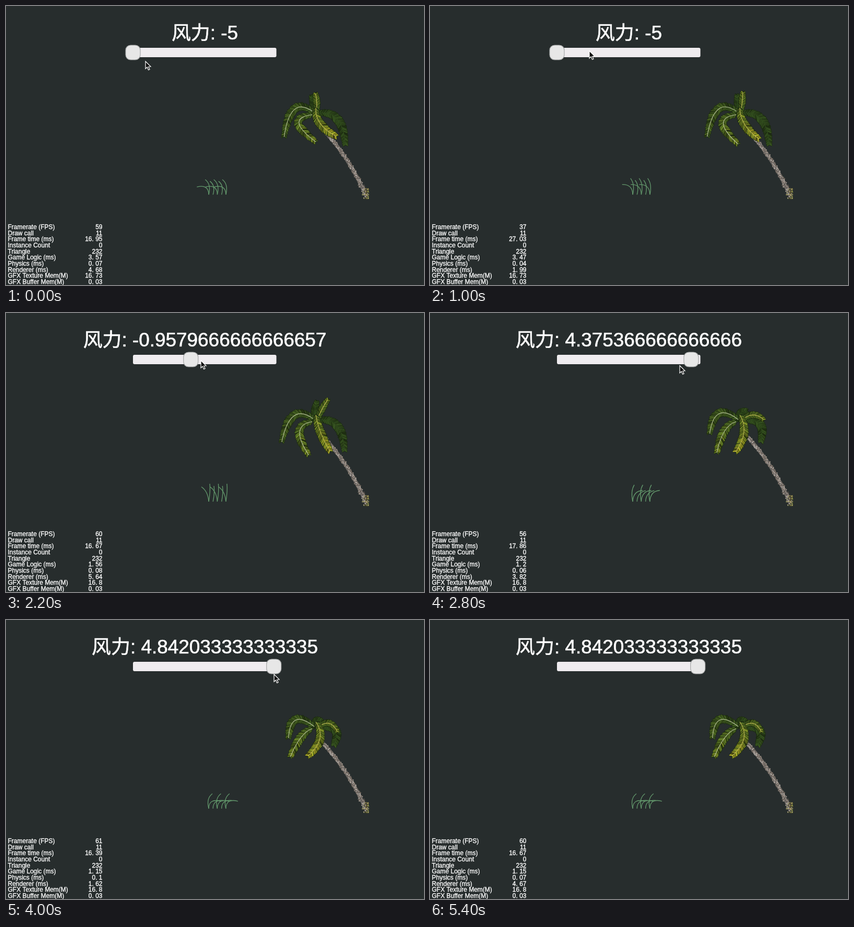
Recreate the animation shown at these times as an HTML page with a canvas. Size 800 px wide and 534 px high, loop 5.6 s.

```html
<!DOCTYPE html>
<html lang="zh-CN">
<head>
<meta charset="utf-8">
<style>
html, body { margin: 0; width: 100%; height: 100%; overflow: hidden; background: #272d2d; }
canvas { display: block; }
</style>
</head>
<body>
<canvas id="stage" width="800" height="534"></canvas>
<script>
const ctx = document.getElementById('stage').getContext('2d');
const LOOP = 5600, STEP = 200;
const FONT = '"Liberation Sans", Arial, "Noto Sans CJK SC", "Noto Sans CJK", sans-serif';

// Rows of [time, ...values]
const windKeys = [[0, -5], [1400, -5], [2200, -0.9579666666666657], [2800, 4.375366666666666], [3000, 4.842033333333335]];
const pointerKeys = [[400, 267, 106], [1000, 305, 86], [1400, 262, 88], [2200, 373, 91], [3000, 513, 104]];

const fpsSamples = [59, 58, 37, 52, 60, 56, 59, 61, 60, 60];

// angle (degrees) and length of the tip seen from the base, at full left and full right
const fronds = [
  { base: [588, 208], knee: [590, 187], angle: [-96, -42], length: [36, 22], size: 8, yellow: 0.1 },
  { base: [598, 205], knee: [645, 199], angle: [50, 50], length: [80, 46], size: 11, yellow: 0.1 },
  { base: [594, 208], knee: [608, 184], sway: 12, angle: [-93, 9], length: [40, 41], size: 8, yellow: 0.6 },
  { base: [590, 204], knee: [544, 168], angle: [141, 156], length: [74, 54], size: 11, yellow: 0.4, rim: true },
  { base: [586, 208], knee: [548, 215], sway: 16, angle: [82, 128], length: [52, 68], size: 11, yellow: 0.65, rim: true },
  { base: [593, 195], knee: [603, 227], sway: 13, angle: [54, 103], length: [67, 67], size: 11, yellow: 1 }];

function seeded(seed) {
  return () => {
    seed = (seed * 16807) % 2147483647;
    return seed / 2147483647;
  };
}

const mix = (a, b, f) => a + (b - a) * f;

function track(keys, at) {
  let i = keys.length - 1;
  while (i > 0 && keys[i][0] > at) i--;
  const a = keys[i], b = keys[i + 1] || a;
  const f = b === a ? 0 : Math.max(0, (at - a[0]) / (b[0] - a[0]));
  return a.slice(1).map((v, k) => mix(v, b[k + 1], f));
}

function bezier(p, s) {
  const u = 1 - s;
  const point = k => u * u * p[k] + 2 * u * s * p[k + 2] + s * s * p[k + 4];
  const slope = k => u * (p[k + 2] - p[k]) + s * (p[k + 4] - p[k + 2]);
  return { x: point(0), y: point(1), angle: Math.atan2(slope(1), slope(0)) };
}

function line(x, y, dx, dy, color, width) {
  ctx.strokeStyle = color;
  ctx.lineWidth = width;
  ctx.beginPath();
  ctx.moveTo(x, y);
  ctx.lineTo(x + dx, y + dy);
  ctx.stroke();
}

function curve(p, color, width) {
  ctx.strokeStyle = color;
  ctx.lineWidth = width;
  ctx.beginPath();
  ctx.moveTo(p[0], p[1]);
  ctx.quadraticCurveTo(p[2], p[3], p[4], p[5]);
  ctx.stroke();
}

function text(string, x, y, size, align) {
  ctx.font = `${size}px ${FONT}`;
  ctx.textAlign = align;
  ctx.fillStyle = ctx.strokeStyle = '#fff';
  ctx.lineWidth = 0.2 + size / 80;
  ctx.fillText(string, x, y);
  ctx.strokeText(string, x, y);
}

// -1 is blown fully left, 1 fully right
function bendAt(t, wind) {
  const raw = 0.219 * wind - 0.27 + 0.21 * Math.cos(2 * Math.PI * (t - 3960) / 1480);
  return raw < -0.4 ? mix(-0.4, raw, 0.55) : Math.min(1, raw);
}

function drawBlade(x, lean, bend, scale) {
  const y = 361, dx = (8 * lean + 15 * bend) * scale;
  const dy = (-35 + 0.03 * dx * dx + 5 * bend * bend) * scale;
  curve([x, y, x + 2.5 * (lean - bend), y - 20 * scale, x + dx, y + dy], '#649a6d', 1.3);
}

function drawGrass(bend) {
  for (let i = 0; i < 5; i++) {
    const x = 388 + 8.2 * i;
    drawBlade(x, 1, bend, i % 2 ? 0.88 : 1);
    if (i % 2 === 0) drawBlade(x, -1, bend, 1);
  }
}

function drawTrunk() {
  const rand = seeded(77), path = [690, 365, 655, 285, 600, 229];
  curve(path, '#6b6662', 7);
  for (let i = 0; i < 260; i++) {
    const s = i / 260, p = bezier(path, s);
    const half = mix(5.5, 3.4, Math.min(1, s * 1.6));
    const side = (rand() * 2 - 1) * half, a = p.angle + Math.PI / 2;
    const x = p.x + Math.cos(a) * side, y = p.y + Math.sin(a) * side;
    line(x - 1, y, 2, 2 * rand() - 1, `hsl(28 9% ${32 + rand() * 42}%)`, 1.8);
  }
  for (let i = 0; i < 50; i++) {
    const s = rand();
    line(mix(694, 683, s * rand()) - 3 * s, 368 - 20 * rand(), rand() * 3 - 1, 2,
      `hsl(${42 + rand() * 30} 32% ${18 + rand() * 45}%)`, 1.5);
  }
}

function frondPath({ base, knee, sway = 0, angle, length }, bend) {
  const f = (bend + 1) / 2;
  const turn = mix(...angle, f) * Math.PI / 180;
  const reach = mix(...length, f) + 9 * (1 - bend * bend);
  return [...base, knee[0] + sway * bend, knee[1],
    base[0] + reach * Math.cos(turn), base[1] + reach * Math.sin(turn)];
}

function drawFrond(frond, bend, index) {
  const rand = seeded(501 + index * 97), path = frondPath(frond, bend);
  const leaves = [];
  for (let i = 0; i < 75; i++) {
    const s = i / 75, p = bezier(path, s);
    const size = frond.size * Math.sin(Math.PI * (0.14 + 0.74 * s)) ** 0.6;
    for (const side of [-1, 1]) {
      const angle = p.angle + side * (0.8 + 0.2 * rand());
      const reach = size * (0.85 + 0.2 * rand());
      const q = Math.min(1, frond.yellow * (0.4 + 0.6 * s) * (0.5 + 0.8 * rand()));
      leaves.push({
        x: p.x, y: p.y, dx: Math.cos(angle) * reach, dy: Math.sin(angle) * reach,
        color: `hsl(${96 - 40 * q} ${42 + 24 * q}% ${11 + rand() * (12 + 34 * q)}%)`
      });
    }
  }
  for (const l of leaves) line(l.x, l.y, l.dx, l.dy, '#1b2a12', 3.2);
  for (const l of leaves) line(l.x, l.y, l.dx * 0.97, l.dy * 0.97, l.color, 1.2);
  curve(path, frond.rim ? '#b4bf98' : frond.yellow > 0.5 ? '#b9b552' : '#2e4a1d', 1.2);
}

function drawPointer(x, y) {
  ctx.beginPath();
  [[0, 0], [0, 14], [3.2, 11], [5.6, 16.5], [8, 15.5], [5.7, 10.2], [10, 10]]
    .forEach(([dx, dy]) => ctx.lineTo(x + dx, y + dy));
  ctx.closePath();
  ctx.fillStyle = '#111';
  ctx.fill();
  ctx.strokeStyle = '#fff';
  ctx.lineWidth = 1.2;
  ctx.stroke();
}

function roundBox(x, y, w, h, r, color) {
  ctx.beginPath();
  ctx.roundRect(x, y, w, h, r);
  ctx.fillStyle = color;
  ctx.fill();
}

function drawSlider(wind) {
  text('风力: ' + wind, 380.5, 64, 36.9, 'center');
  roundBox(243, 80, 274.5, 18, 3, '#efecef');
  roundBox(380 + 27.4 * wind - 14, 75, 28, 28, 9.5, '#e7e7e7');
  ctx.strokeStyle = '#a5a7a7';
  ctx.lineWidth = 1.2;
  ctx.stroke();
}

function drawStats(t) {
  const sample = Math.floor((t + 400) / 600), fps = fpsSamples[sample];
  const rand = seeded(9000 + sample * 7321);
  rand();
  const round = v => Math.round(v * 100) / 100;
  const rows = {
    'Framerate (FPS)': fps,
    'Draw call': 11,
    'Frame time (ms)': round(1000 / fps),
    'Instance Count': 0,
    'Triangle': 232,
    'Game Logic (ms)': round(1 + 2.4 / (1 + Math.exp((t - 1800) / 250)) + 0.2 * rand()),
    'Physics (ms)': round(0.04 + 0.06 * rand()),
    'Renderer (ms)': round(1.2 + 4.8 * rand() ** 2),
    'GFX Texture Mem(M)': t < 1800 ? 16.73 : 16.8,
    'GFX Buffer Mem(M)': 0.03
  };
  Object.entries(rows).forEach(([label, value], i) => {
    const y = 427 + 11.67 * i;
    text(label, 3.5, y, 12, 'left');
    text(String(value).replace('.', '. '), 184.5, y, 12, 'right');
  });
}

function draw(t) {
  const [wind] = track(windKeys, t);
  const bend = bendAt(t, wind);
  ctx.fillStyle = '#272d2d';
  ctx.fillRect(0, 0, 800, 534);
  drawGrass(bend);
  drawTrunk();
  fronds.forEach((frond, i) => drawFrond(frond, bend, i));
  drawSlider(wind);
  drawStats(t);
  if (t < 5000) drawPointer(...track(pointerKeys, t));
}

const start = performance.now();
function tick() {
  const t = (performance.now() - start) % LOOP;
  draw(Math.floor(t / STEP) * STEP);
  requestAnimationFrame(tick);
}
tick();
</script>
</body>
</html>
```
